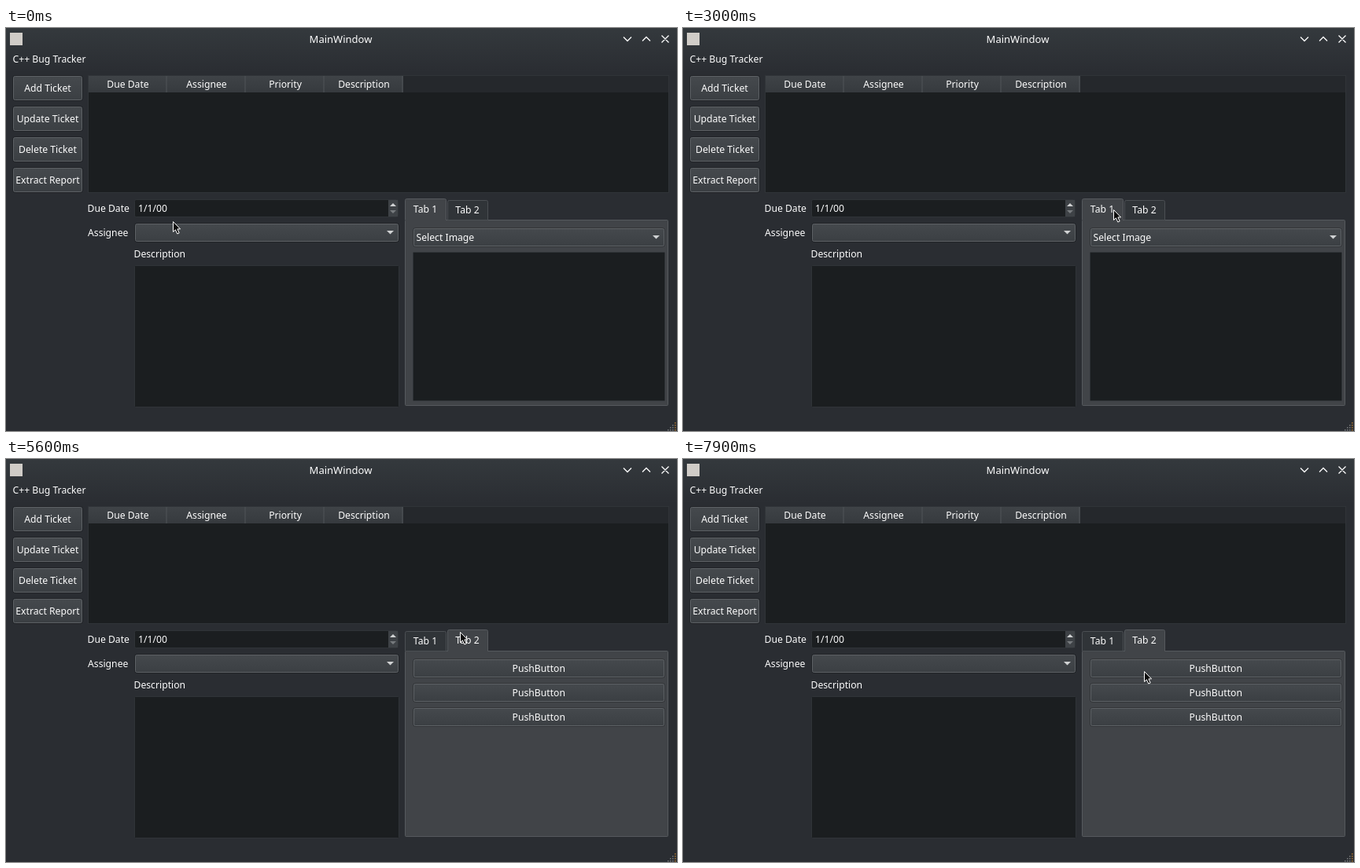
An HTML page for the animation above (8000 ms loop, 853 by 513 pixels).

```html
<!DOCTYPE html>
<html lang="en">
<head>
<meta charset="utf-8">
<title>Bug tracker window</title>
<style>
html, body { margin: 0; width: 100%; height: 100%; overflow: hidden; background: #2a2d32; }
svg { display: block; width: 853px; height: 513px; }
text { font: 12.2px "Noto Sans", sans-serif; fill: #fcfcfc; }
.title { font-size: 13px; }
.button { fill: url(#raised); stroke: #5d6165; }
.shadow { fill: none; stroke: #000; stroke-opacity: .22; }
.pressed .button { fill: #34383c; }
.view { fill: #1b1e20; stroke: #303438; }
.panel { fill: #414448; stroke: #55595d; }
.tab { fill: #303438; stroke: #4b4f53; }
.line { fill: none; stroke: #fcfcfc; stroke-width: 1.3; }
</style>
</head>
<body>
<svg id="stage" viewBox="0 0 853 513" xmlns="http://www.w3.org/2000/svg"></svg>
<script>
const box = (cls, x, y, w, h, r = 2) =>
  `<rect class="${cls}" x="${x + .5}" y="${y + .5}" width="${w - 1}" height="${h - 1}" rx="${r}"/>`;
const fill = (color, x, y, w, h) =>
  `<rect fill="${color}" x="${x}" y="${y}" width="${w}" height="${h}"/>`;
const label = (s, x, y, anchor = 'start', cls = '') =>
  `<text class="${cls}" x="${x}" y="${y}" text-anchor="${anchor}">${s}</text>`;
const centered = (s, x, y) => label(s, x, y, 'middle');
const raised = (x, y, w, h) =>
  box('shadow', x - 1, y - 1, w + 2, h + 2, 3) + box('button', x, y, w, h);
const arrow = (x, y, size, color = '#d0d2d3') =>
  `<path fill="${color}" d="M${x - Math.abs(size)} ${y}h${2 * Math.abs(size)}L${x} ${y + size}z"/>`;
const combo = (x, y, w, text = '') =>
  raised(x, y, w, 23) + label(text, x + 3.5, y + 16) + arrow(x + w - 10.5, y + 9, 4.5);
const group = (id, content) => `<g id="${id}">${content}</g>`;
const repeat = (items, make) => items.map(make).join('');
const gradient = (id, top, bottom) =>
  `<linearGradient id="${id}" x2="0" y2="1"><stop stop-color="${top}"/><stop offset="1" stop-color="${bottom}"/></linearGradient>`;

const defs = '<defs>' + gradient('raised', '#45494d', '#3b3f43') +
  gradient('header', '#3f4347', '#363a3e') + gradient('titlebar', '#34393d', '#2a2d32') + '</defs>';

const windowFrame =
  fill('#2a2d32', 0, 0, 853, 513) +
  fill('url(#titlebar)', 0, 0, 853, 56) +
  fill('#d0ccc7', 5, 6, 16, 16) +
  label('MainWindow', 425.5, 19, 'middle', 'title') +
  '<path class="line" d="M785 11.5l5 5 5-5M809 16.5l5-5 5 5M833.5 9.5l9 9m0-9l-9 9"/>' +
  label('C++ Bug Tracker', 8.5, 44);

const sideButtons = repeat(['Add Ticket', 'Update Ticket', 'Delete Ticket', 'Extract Report'],
  (s, i) => raised(9, 61 + 39 * i, 88, 31) + centered(s, 53, 81 + 39 * i));

const table = box('view', 104, 60, 739, 150, 0) + fill('#25282c', 105, 61, 737, 21) +
  repeat(['Due Date', 'Assignee', 'Priority', 'Description'], (s, i) =>
    fill('url(#header)', 105 + 100 * i, 61, 100, 21) +
    fill('#505458', 203.5 + 100 * i, 61, 1, 21) + centered(s, 155 + 100 * i, 76));

const form =
  label('Due Date', 103.5, 234) + box('view', 163, 218, 336, 23) + label('1/1/00', 168, 234) +
  fill('#3e4246', 486, 219, 12, 21) + arrow(492, 227, -4) + arrow(492, 232, 4, '#777b7e') +
  label('Assignee', 104, 265) + combo(164, 249, 335) +
  label('Description', 162.5, 292) + box('view', 163, 302, 337, 181, 1);

const tab = (text, x, w, selected) => {
  const top = selected ? 217.5 : 219.5;
  const outline = `M${x + .5} 244.5V${top + 2}q0-2 2-2H${x + w - 2.5}q2 0 2 2V244.5`;
  return `<path class="${selected ? 'panel' : 'tab'}" d="${outline}${selected ? '' : 'z'}"/>` +
    (selected ? fill('#414448', x + 1, 243, w - 2, 4) : '') +
    centered(text, x + w / 2 - .5, selected ? 235 : 236);
};
const tabBar = active => tab('Tab 1', 507, 53, active === 1) + tab('Tab 2', 561, 52, active === 2);

const tabs = box('panel', 507, 244, 335, 237, 1) +
  group('tab1', tabBar(1) + combo(518, 255, 319, 'Select Image') + box('view', 517, 285, 321, 190, 1)) +
  group('tab2', tabBar(2) + repeat([0, 1, 2], i => group('push' + i,
    raised(518, 255 + 31 * i, 319, 23) + centered('PushButton', 677.3, 271 + 31 * i)))) +
  group('popup', fill('#202326', 517, 253, 321, 29) + fill('#3daee9', 518, 255, 319, 25) +
    label('Select Image', 525, 272));

const grip = repeat([0, 1, 2, 3], row => repeat([0, 1, 2, 3].slice(0, row + 1), col =>
  fill(col ? '#777a7c' : '#a9752f', 850 - 3 * col, 502 + 3 * row, 1.5, 1.5)));
const pointerShape = '<path fill="#0b0b0b" stroke="#fff" stroke-linejoin="round" ' +
  'd="M.5-.5V12.5L3.4 9.8 5.8 15 8.2 14 5.9 8.9H9.6z"/>';

stage.innerHTML = defs + windowFrame + sideButtons + table + form + tabs + grip +
  group('pointer', pointerShape);

// Pointer moves: start time, end time, destination
const home = [212, 247];
const moves = [
  [100, 200, 481, 247],
  [300, 600, 24, 72],
  [800, 1300, 60, 98],
  [1500, 2200, 585, 233],
  [2500, 2900, 547, 232],
  [3500, 3800, 590, 298],
  [3800, 4300, 824, 269],
  [4600, 4800, 790, 269],
  [5000, 5400, 577, 221],
  [5800, 6000, 700, 255],
  [6000, 6400, 578, 268],
  [6500, 7400, 582, 330],
  [7400, 7900, 586, 271]
];
const easeOut = k => Math.sin(Math.min(1, Math.max(0, k)) * Math.PI / 2);
const pointerAt = t => moves.reduce(([x, y], [from, to, endX, endY]) => {
  const k = easeOut((t - from) / (to - from));
  return [x + (endX - x) * k, y + (endY - y) * k];
}, home).map(Math.round);

const find = id => document.getElementById(id);
const show = (id, on) => find(id).setAttribute('visibility', on ? 'visible' : 'hidden');
const within = (t, from, to) => t >= from && t < to;

function draw(now) {
  const t = Math.floor(now % 8000 / 100) * 100;
  const second = within(t, 2300, 3000) || t >= 5600;
  show('tab1', !second);
  show('tab2', second);
  show('popup', within(t, 4400, 5100));
  for (let i = 0; i < 3; i++) {
    const press = 6600 + 400 * i;
    find('push' + i).classList.toggle('pressed', within(t, press, press + 100));
  }
  find('pointer').setAttribute('transform', `translate(${pointerAt(t)})`);
}
const start = performance.now();
const tick = () => { draw(performance.now() - start); requestAnimationFrame(tick); };
tick();
</script>
</body>
</html>
```
